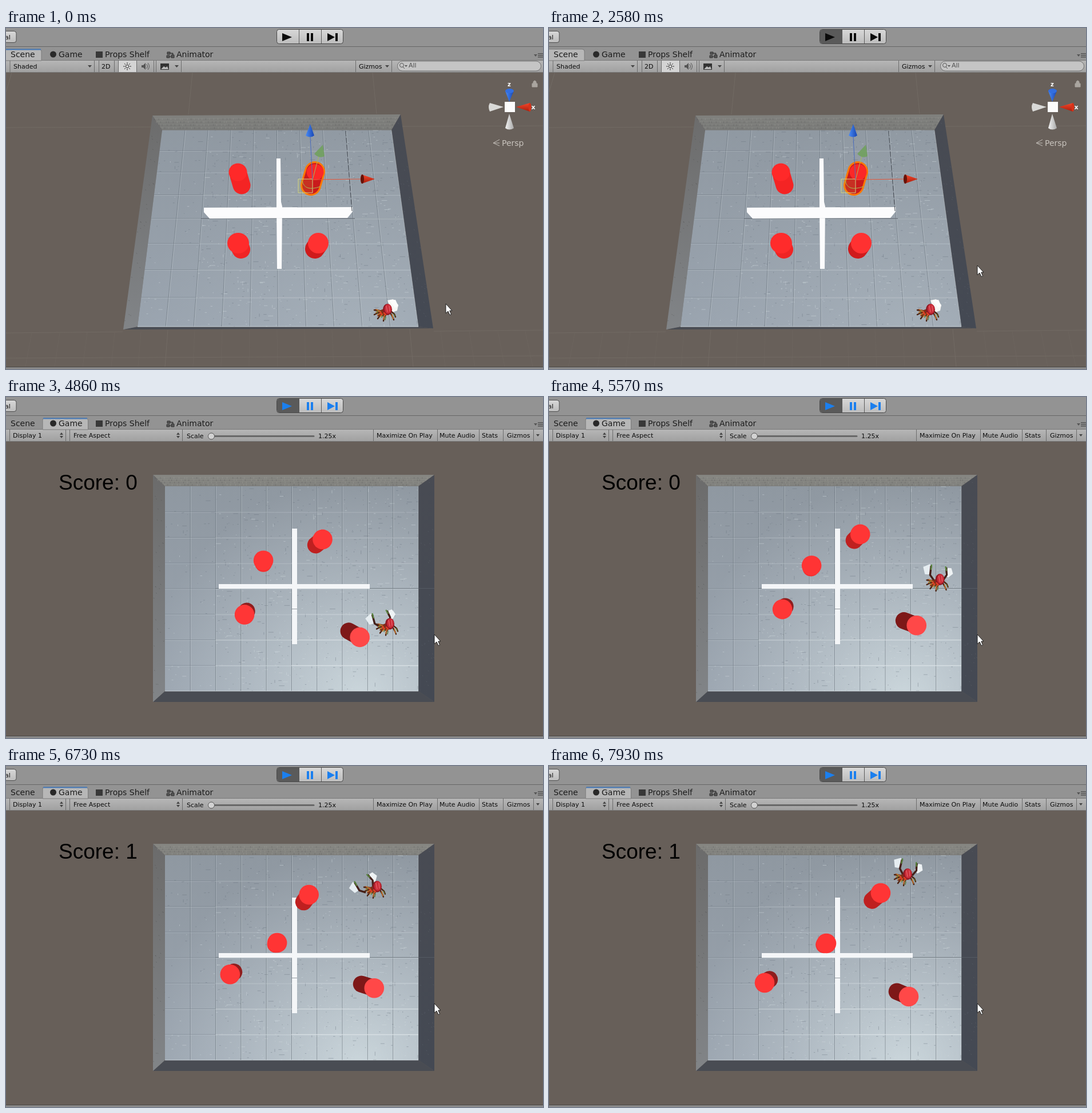
Write an HTML page with a canvas that moves like this. It is 939x596 px and loops after 8 s.

```html
<!DOCTYPE html>
<html lang="en">
<head>
<meta charset="utf-8">
<title>Arena play test</title>
<style>
html, body { margin: 0; width: 100%; height: 100%; overflow: hidden; background: #68605a; }
canvas, svg { position: absolute; left: 0; top: 0; display: block; }
text { font: 11px "DejaVu Sans", sans-serif; fill: #0c0c0c; white-space: pre; }
.tab { font-size: 14px; fill: #1c1c1c; }
#score { font: 37px "Liberation Sans", Arial, sans-serif; fill: #000; }
.sep { stroke: #6c6c6c; fill: none; }
</style>
</head>
<body>
<canvas id="sceneFloor" width="939" height="596"></canvas>
<canvas id="gameFloor" width="939" height="596"></canvas>
<svg width="939" height="596" viewBox="0 0 939 596">
  <defs>
    <linearGradient id="btn" x2="0" y2="1"><stop stop-color="#d8d8d8"/><stop offset="1" stop-color="#bcbcbc"/></linearGradient>
    <linearGradient id="bar" x2="0" y2="1"><stop stop-color="#b6b6b6"/><stop offset="1" stop-color="#a1a1a1"/></linearGradient>
    <linearGradient id="grey"><stop stop-color="#f2f2f2"/><stop offset="1" stop-color="#a9a9a9"/></linearGradient>
    <linearGradient id="blue"><stop stop-color="#4b8cf5"/><stop offset="1" stop-color="#1746b4"/></linearGradient>
    <linearGradient id="red" x2="0" y2="1"><stop stop-color="#f5472b"/><stop offset="1" stop-color="#a81d0c"/></linearGradient>
    <g id="bug" fill="none" stroke-linecap="round" stroke-linejoin="round">
      <path d="M-8 4-16 2-23 1M-9 6-17 6-23 9M-10 8-14 12-17 16M-2 8-6 14-7 20M5 6 9 13 11 18M6 3 12 8 14 13" stroke="#4c2312" stroke-width="2.4"/>
      <path d="M-22-1-12 1-4-2 0 6-5 13-12 11-18 12-15 6Z" fill="#7c3019"/>
      <path d="M-19 0-12 4M-17 9-11 6M-13 13-9 8M-5 10-7 17M-20 5-16 3M8 9 10 16" stroke="#c4762f" stroke-width="1.8"/>
      <path d="M-17 2-18 6M-9 10-10 14M-3 13-4 18M11 8 13 12" stroke="#5c7c33" stroke-width="1.4"/>
      <ellipse cx="0" cy="0" rx="8" ry="10" fill="#8d1823"/>
      <ellipse cx="1" cy="-1" rx="6" ry="8.500" fill="#cb2c38"/>
      <path d="M-2-6 0 4M3-6 4 3" stroke="#e4616a" stroke-width="1.3"/>
      <path d="M-12 5-10 9M-6 6-3 9" stroke="#e03a24" stroke-width="2.6"/>
    </g>
    <g id="claws">
      <path d="M-26-24-14-28-11-20-17-10-24-11Z" fill="#e6edf1"/>
      <path d="M17-19 23-18 25-8 16-2 11-8Z" fill="#eef2f4"/>
      <path d="M-9 1-15-9-12-25M7 2 14-7 14-20" fill="none" stroke="#44201a" stroke-width="3.4"/>
      <path d="M-13-18-11-27M14-14 13-22" fill="none" stroke="#56863b" stroke-width="2.2"/>
    </g>
  </defs>

  <g id="scene">
    <g stroke="#777069" stroke-width="1" opacity=".65">
      <path d="M0 174 253 173M693 172 939 171M326 78 319 151M641 78 648 150M0 533 204 531M748 530 939 528M283 528 278 592M706 526 712 592M10 78 0 112M0 577 939 573" fill="none"/>
      <path d="M45 533 34 592M94 533 85 592M142 532 134 592M190 532 184 592M236 530 231 592M330 528 327 592M378 528 376 592M426 528 425 592M474 528 475 592M522 528 524 592M570 528 573 592M618 528 622 592M666 528 671 592M760 530 768 592M810 530 820 592M860 530 872 592M908 530 921 592" opacity=".45"/>
    </g>
    <path d="M341 333H610" stroke="#565d66"/>
    <path d="M346 314 606 313V321L597 332 356 333 346 322ZM473 228H480L481 304 483 312 482 421H474L473 312Z" fill="#fcfcfd"/>
    <path d="M594 180 605 320" stroke="#454a52" stroke-dasharray="9 3"/>
    <g stroke-linecap="round">
      <path d="M407 258 412 275" stroke="#f42424" stroke-width="31"/><ellipse cx="405.5" cy="252" rx="16" ry="15.5" fill="#ff2929"/>
      <path d="M407 378 411 387" stroke="#f02424" stroke-width="32"/><ellipse cx="406" cy="376" rx="19" ry="18" fill="#ff2b2b"/>
      <path d="M545 379 540 386" stroke="#cf1b1c" stroke-width="34"/><ellipse cx="546" cy="376" rx="18" ry="18" fill="#ff3131"/>
      <path d="M540 251 533 275" stroke="#ff7800" stroke-width="36"/>
      <path d="M540 251 533 275" stroke="#c91b1c" stroke-width="30"/><ellipse cx="540.5" cy="252" rx="15" ry="14" fill="#fb2828"/>
    </g>
    <g fill="none">
      <path d="M511 264H536V288H511Z" stroke="#d2d684" fill="#b6b34b" fill-opacity=".14"/>
      <path d="M518 267Q522 287 550 277M536 265 547 224" stroke="#a5bd55"/>
      <path d="M536 265 532 190" stroke="#4a6cbd"/>
      <path d="M536 265 621 264" stroke="#e5573b"/>
    </g>
    <path d="M532 168 539 188Q532 193 524 188Z" fill="url(#blue)"/>
    <path d="M645 264 622 272Q618 264 622 256Z" fill="url(#red)"/><ellipse cx="623" cy="264" rx="3" ry="8" fill="#661207"/>
    <path d="M554 204 557 224Q548 229 539 220Z" fill="#6fa05c" opacity=".88"/>
    <path d="M667 476 677 474 686 484 684 494 675 497Z" fill="#f6f6f3"/>
    <use href="#bug" transform="translate(667 492)"/>
    <path d="M670 476 681 475 686 486 680 489Z" fill="#fcfcfb"/>

    <path d="M873 110 880 129 888 110Z" fill="url(#blue)"/><ellipse cx="880.5" cy="110" rx="7.5" ry="4" fill="#326ee0"/>
    <path d="M916 131 892 138 916 146Z" fill="url(#red)"/><ellipse cx="916" cy="138.5" rx="2.5" ry="7.5" fill="#d73219"/>
    <path d="M846 131 870 138 846 146Q842 138 846 131Z" fill="#d9d9d7"/>
    <path d="M873 175 880 150 888 175Q880 180 873 175Z" fill="url(#grey)"/>
    <path d="M872 129H890V147H872Z" fill="#fcfcfc"/>
    <text x="877" y="102" style="font-weight:bold;font-size:10px;fill:#fff">z</text>
    <text x="918.500" y="142" style="font-weight:bold;font-size:11px;fill:#fff">x</text>
    <path d="M920 97H929V103H920ZM922 97V94Q924.500 90 927 94V97" fill="#aaa59f" fill-rule="evenodd" stroke="#aaa59f"/>
    <path d="M863 195 852 201 863 206M852 201H863" fill="none" stroke="#c5c0ba"/>
    <text x="867" y="206" style="font-size:14px;fill:#c8c3bd">Persp</text>
  </g>

  <g id="game">
    <path d="M366 334.500H378M600 334.500H749" stroke="#5a626b" opacity=".7"/>
    <path d="M372 327H636V335H372ZM500 230H509V432H500Z" fill="#f4f6f8"/>
    <path d="M500 370.500H509" stroke="#939aa0"/>
    <g id="posts"></g>
    <g id="hero"><use id="arms" href="#claws"/><use href="#bug"/></g>
    <text id="score" x="92" y="162">Score: 0</text>
  </g>

  <path d="M0 0H939V33H0Z" fill="#939393"/>
  <path d="M0 33H939V57H0Z" fill="#939393"/>
  <path d="M0 32.500H939" stroke="#666"/>
  <path d="M0 57H939V77H0Z" fill="url(#bar)"/>
  <path d="M0 56.500H939M0 77.500H939" stroke="#787878"/>
  <rect x="-30" y="5.500" width="48" height="20" rx="4" fill="url(#btn)" stroke="#4d4d4d"/>
  <text x="-2" y="20">al</text>
  <rect x="473.500" y="2.500" width="116" height="25" rx="4" fill="url(#btn)" stroke="#484848"/>
  <path id="pressed" d="M477 3H512V27H477Q474 27 474 23V6Q474 3 477 3Z" fill="#5a5a5a"/>
  <path d="M512.500 3V27M551.500 3V27" stroke="#5a5a5a"/>
  <path id="icons" d="M483 9 500 16 483 23ZM526 9H530V23H526ZM533 9H537V23H533ZM562 9 575 16 562 23ZM576 9H580V23H576Z"/>

  <g id="tabScene"><path d="M-2 56V37H58Q62 37 62 41V57H-2Z" fill="#b7b7b7" stroke="#7a7a7a"/><path class="focus" d="M0 37.500H61" stroke="#4478b8" stroke-width="2"/></g>
  <g id="tabGame"><path d="M64 57V40Q64 37 67 37H140Q143.500 37 143.500 41V57Z" fill="#b7b7b7" stroke="#7a7a7a"/><path d="M65 37.500H142" stroke="#4478b8" stroke-width="2"/></g>
  <text class="tab" x="8" y="51">Scene</text>
  <circle cx="82.500" cy="46" r="5.500" fill="#292929"/><text class="tab" x="92" y="51">Game</text>
  <path d="M157 41H169V52H157Z" fill="#383838"/><text class="tab" x="173" y="51">Props Shelf</text>
  <path d="M282 42H287V46H282ZM281 48H286V52H281ZM289 47H294V52H289ZM287 44H292V47M286 50H290" fill="#555" stroke="#333"/>
  <text class="tab" x="298" y="51">Animator</text>
  <path d="M923 46H929L926 50ZM930 44H939V45.500H930ZM930 47H939V48.500H930ZM930 50H939V51.500H930Z" fill="#555"/>

  <g id="sceneBar">
    <path d="M197 57H228V77H197Z" fill="#d4d4d4"/>
    <path class="sep" d="M7 57V77M154.500 57V77M162.500 57V77M189.500 57V77M196.500 57V77M228.500 57V77M258.500 57V77M262.500 57V77M306.500 57V77M611.500 57V77M674.500 57V77"/>
    <text x="13" y="71">Shaded</text><text x="167" y="71">2D</text><text x="617" y="71">Gizmos</text>
    <path d="M143 65H150L146.500 69ZM295 65H302L298.500 69ZM663 65H670L666.500 69Z" fill="#444"/>
    <circle cx="212" cy="67" r="2.700" fill="none" stroke="#333"/>
    <path d="M212 60V63M212 71V74M205 67H208M216 67H219M207 62 209 64M215 70 217 72M217 62 215 64M209 70 207 72" stroke="#333"/>
    <path d="M237 65H240L244 61V73L240 69H237Z" fill="#555"/><path d="M246 63Q249 67 246 71M248 61Q253 67 248 73" fill="none" stroke="#555"/>
    <path d="M270 62H285V73H270Z" fill="#333"/><path d="M271 72 276 67 279 69 282 67 284 72Z" fill="#bbb"/>
    <rect x="684.500" y="58" width="251" height="17" rx="8.500" fill="#c5c5c5" stroke="#707070"/>
    <circle cx="692" cy="65" r="3.500" fill="none" stroke="#555"/><path d="M694 68 697 71" stroke="#555"/><path d="M697 65H702L699.500 68Z" fill="#555"/>
    <text x="704" y="69" style="fill:#505050">All</text>
  </g>
  <g id="gameBar">
    <path class="sep" d="M6.500 57V77M104.500 57V77M111.500 57V77M308.500 57V77M642.500 57V77M754.500 57V77M827.500 57V77M869.500 57V77M922.500 57V77"/>
    <text x="12" y="71">Display 1</text><text x="118" y="71">Free Aspect</text><text x="316" y="72">Scale</text><text x="546" y="72">1.25x</text>
    <text x="648" y="71">Maximize On Play</text><text x="758" y="71">Mute Audio</text><text x="832" y="71">Stats</text><text x="876" y="71">Gizmos</text>
    <path d="M94 66 97 62 100 66ZM94 68H100L97 72ZM298 66 301 62 304 66ZM298 68H304L301 72ZM927 65H933L930 69Z" fill="#444"/>
    <path d="M356 68.500H538" stroke="#686868" stroke-width="3" stroke-linecap="round"/><circle cx="359" cy="68.500" r="5.500" fill="#d2d2d2" stroke="#555"/>
  </g>
  <path d="M0 592H939V596H0Z" fill="#8a8a8a"/><path d="M0 592.500H939" stroke="#4b4845"/>
  <path id="cursor" d="M0 0V16.500L4 13 7 19.500 9.500 18.500 6.800 12H11Z" fill="#fff" stroke="#111" stroke-width=".9"/>
</svg>
<script>
const $ = id => document.getElementById(id);
const LOOP = 8000, PRESS = 460, PLAY = 3130, MOVE = 3590, TICK = 78.9;

function rng(seed) {
  return () => (seed = (seed * 16807) % 2147483647) / 2147483647;
}

// Paints one walled room; at(u, v) maps floor coordinates to the stage.
function paintRoom(id, bg, outer, at, glow) {
  const c = $(id).getContext('2d'), rand = rng(77);
  const poly = (pts, fill) => {
    c.beginPath();
    pts.forEach(p => c.lineTo(...p));
    c.closePath();
    c.fillStyle = fill;
    c.fill();
  };
  const line = (a, b, color, width = 1) => {
    c.beginPath();
    c.moveTo(...a);
    c.lineTo(...b);
    c.strokeStyle = color;
    c.lineWidth = width;
    c.stroke();
  };
  const grad = (y0, y1, a, b) => {
    const g = c.createLinearGradient(0, y0, 0, y1);
    g.addColorStop(0, a);
    g.addColorStop(1, b);
    return g;
  };
  const mix = (a, b, k) => [a[0] + (b[0] - a[0]) * k, a[1] + (b[1] - a[1]) * k];
  const inner = [at(0, 0), at(1, 0), at(1, 1), at(0, 1)];
  c.fillStyle = bg;
  c.fillRect(0, 0, 939, 596);
  const side = (i, fill) => {
    const j = (i + 1) % 4;
    poly([outer[i], outer[j], inner[j], inner[i]], fill);
  };
  side(2, '#494c53');
  side(0, grad(136, 180, '#858581', '#777876'));
  side(1, grad(150, 525, '#484b53', '#444953'));
  side(3, grad(150, 525, '#6c6c6c', '#818487'));

  for (let r = 1; r < 5; r++) {
    const a = mix(outer[0], inner[0], r / 5), b = mix(outer[1], inner[1], r / 5);
    line(a, b, 'rgba(160,160,155,.25)');
    for (let k = 0; k < 62; k++) {
      const p = mix(a, b, (k + rand() * .6) / 62);
      line(p, [p[0], p[1] + 3], rand() < .5 ? 'rgba(80,80,80,.3)' : 'rgba(175,175,170,.3)');
    }
  }
  for (let k = 0; k < 60; k++) {
    const v = rand(), s = rand(), i = k % 2;
    const p = mix(mix(outer[i], inner[i], s), mix(outer[3 - i], inner[3 - i], s), v);
    line(p, [p[0] + 1.5, p[1] + 1], i ? 'rgba(120,126,135,.3)' : 'rgba(70,70,70,.4)');
  }

  poly(inner, grad(156, 520, '#8f98a1', '#9aa4af'));
  c.save();
  c.beginPath();
  inner.forEach(p => c.lineTo(...p));
  c.clip();
  const light = c.createRadialGradient(620, 525, 10, 620, 525, 380);
  light.addColorStop(0, `rgba(222,234,237,${glow})`);
  light.addColorStop(1, 'rgba(205,215,222,0)');
  c.fillStyle = light;
  c.fillRect(200, 130, 560, 400);

  for (let k = 0; k < 1000; k++) {
    const u = rand(), v = rand();
    if (u < .2 && rand() < .75) continue;
    const p = at(u, v), len = 1 + rand() * (rand() < .25 ? 9 : 2.5), flat = rand() < .7;
    const pale = rand() < .3 + v * .35;
    line(p, flat ? [p[0] + len, p[1]] : [p[0], p[1] + len * .7],
      pale ? 'rgba(211,219,225,.45)' : 'rgba(101,111,122,.4)');
  }
  const seam = (a, b, dx, dy, dark, pale) => {
    line(a, b, `rgba(98,107,118,${dark})`);
    line([a[0] + dx, a[1] + dy], [b[0] + dx, b[1] + dy], `rgba(228,235,239,${pale})`);
  };
  for (let i = 1; i < 10; i++) seam(at(i / 10, 0), at(i / 10, 1), 1, 0, .6, .3);
  // Cross seams catch more light toward the near side, glow and right half.
  for (let j = 1; j < 8; j++) {
    const v = j / 8, shine = glow * v * v;
    seam(at(0, v), at(1, v), 0, 1, .4, .25);
    line(at(.2, v), at(1, v), `rgba(232,239,242,${.2 + shine * .8})`);
    line(at(.5, v), at(1, v), `rgba(240,245,247,${shine})`);
  }
  c.restore();
  line(inner[3], inner[2], 'rgba(225,232,236,.75)');
  line(inner[1], inner[2], 'rgba(225,232,236,.3)');
}

paintRoom('sceneFloor', '#68605a', [[256, 153], [690, 151], [747, 525], [205, 527]], (u, v) => {
  const f = v / (1.224 - .224 * v), left = 273 - 43 * f, right = 674 + 47 * f;
  return [left + (right - left) * u, 178.5 + 343.5 * f];
}, .16);
paintRoom('gameFloor', '#675f59', [[257, 136], [749, 136], [749, 533], [257, 533]],
  (u, v) => [278 + 443 * u, 156 + 358 * v], .7);

// Key rows: time, x, y (and arm angle for the hero).
const posts = [
  { top: '#ff3434', side: '#f52e2e', keys: [[3590, 434, 270], [6730, 474, 309], [7930, 485, 310]] },
  { top: '#ff3535', side: '#bf2020', keys: [[3590, 570, 265], [6730, 529, 225], [7930, 580, 222]] },
  { top: '#ff3636', side: '#8f1d1d', keys: [[3590, 433, 397], [5570, 408, 371], [6380, 397, 361], [6730, 392, 364], [7930, 377, 379]] },
  { top: '#ff4848', side: '#7e1818', keys: [[3590, 570, 401], [3830, 579, 405], [4860, 619, 420], [5570, 643, 399], [6190, 651, 391], [6580, 646, 386], [6730, 644, 388], [7930, 629, 403]] }
];
const heroKeys = [
  [3590, 679, 496, 0], [3830, 679, 468, 0], [4390, 673, 422, -13], [4860, 671, 396, -26], [5250, 666, 362, -18],
  [5570, 684, 318, -4], [6200, 686, 262, -4], [6730, 649, 211, -42], [7050, 648, 205, -30], [7930, 627, 189, 3]
];
const cursorKeys = [
  [0, 769, 482], [70, 690, 330], [140, 600, 150], [210, 521, 12], [380, 505, 12], [460, 492, 12],
  [850, 545, 80], [930, 620, 180], [1010, 700, 290], [1080, 760, 370], [1160, 779, 397],
  [1410, 765, 404], [1490, 749, 408], [1570, 760, 409], [1650, 771, 410], [1800, 780, 412],
  [2110, 775, 411], [2190, 767, 411], [2270, 760, 412], [2500, 754, 413], [2580, 749, 415]
];

function sample(keys, t) {
  const i = keys.findIndex(k => k[0] > t);
  if (i < 0) return keys[keys.length - 1].slice(1);
  if (!i) return keys[0].slice(1);
  const a = keys[i - 1], b = keys[i], f = (t - a[0]) / (b[0] - a[0]);
  return a.slice(1).map((v, n) => v + (b[n + 1] - v) * f);
}

function add(tag, attrs) {
  const el = document.createElementNS('http://www.w3.org/2000/svg', tag);
  for (const k in attrs) el.setAttribute(k, attrs[k]);
  return $('posts').appendChild(el);
}
for (const p of posts) {
  p.body = add('path', { stroke: p.side, 'stroke-width': 29.5, 'stroke-linecap': 'round' });
  p.cap = add('circle', { r: 17.3, fill: p.top });
}

const show = (id, on) => { $(id).style.display = on ? '' : 'none'; };

function draw(t) {
  const playing = t >= PLAY;
  for (const id of ['scene', 'sceneFloor', 'sceneBar', 'tabScene']) show(id, !playing);
  for (const id of ['game', 'gameFloor', 'gameBar', 'tabGame']) show(id, playing);
  show('pressed', t >= PRESS);
  $('icons').setAttribute('fill', playing ? '#1b7fee' : '#0b0b0b');
  document.querySelector('.focus').style.display = t < PRESS ? '' : 'none';

  const [cx, cy] = cursorKeys.filter(k => k[0] <= t).pop().slice(1);
  $('cursor').setAttribute('transform', `translate(${cx} ${cy})`);

  const now = MOVE + Math.max(0, Math.floor((t - MOVE + 17) / TICK)) * TICK;
  for (const p of posts) {
    const [x, y] = sample(p.keys, now);
    // The foot leans toward the point below the camera.
    const fx = x - (x - 450) * .115, fy = y - (y - 330) * .12;
    p.body.setAttribute('d', `M${fx} ${fy}L${x} ${y}`);
    p.cap.setAttribute('cx', x);
    p.cap.setAttribute('cy', y);
  }
  const [hx, hy, turn] = sample(heroKeys, now);
  $('hero').setAttribute('transform', `translate(${hx} ${hy})`);
  $('arms').setAttribute('transform', `rotate(${turn} -2 20)`);
  $('score').textContent = 'Score: ' + (t < 5800 ? 0 : 1);
}

const start = performance.now();
function frame() {
  draw((performance.now() - start) % LOOP);
  requestAnimationFrame(frame);
}
frame();
</script>
</body>
</html>
```
